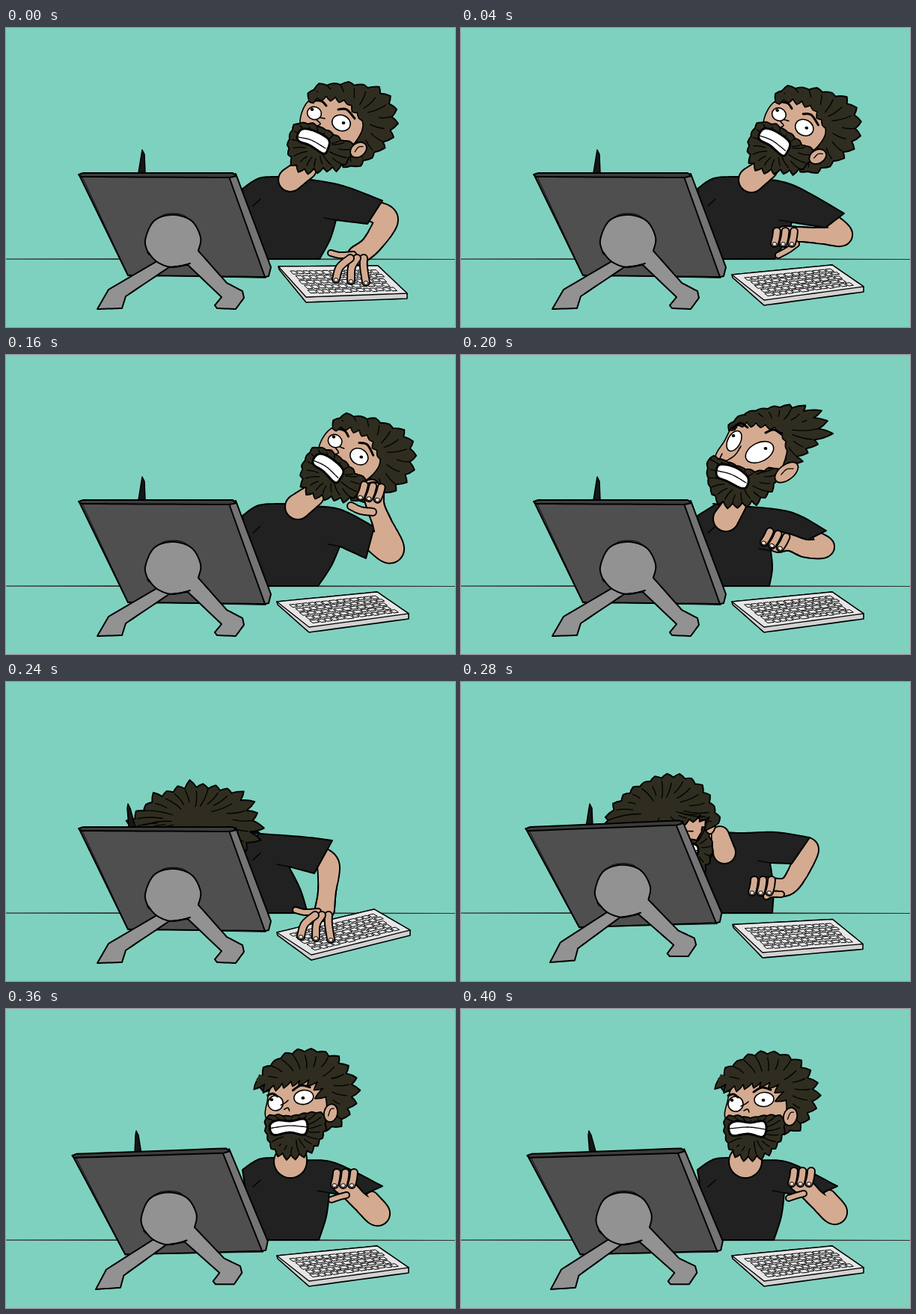
Write an HTML page with a canvas that moves like this. It is 600 by 400 pixels and loops after 440 ms.

```html
<!DOCTYPE html>
<html lang="en">
<head>
<meta charset="utf-8">
<title>Desk rage</title>
<style>
html, body { margin: 0; width: 100%; height: 100%; overflow: hidden; background: #7fd1bf; }
canvas { display: block; width: 600px; height: 400px; }
</style>
</head>
<body>
<canvas id="stage" width="600" height="400"></canvas>
<script>
const ctx = document.getElementById('stage').getContext('2d');
const SKIN = '#d4ab90', HAIR = '#2f2d20', INK = '#000', WHITE = '#fff', GRAY = '#929292';
ctx.lineJoin = ctx.lineCap = 'round';

const mix = (a, b, t) => a.map((v, i) => v + (b[i] - v) * t);
const groups = (s, size = 2) => {
  const n = s.match(/-?[\d.]+/g).map(Number);
  return Array.from({ length: n.length / size }, (_, i) => n.slice(i * size, (i + 1) * size));
};
function seeded(seed) {
  let s = seed * 7919 + 104729;
  return () => (s = s * 16807 % 2147483647) / 2147483647;
}

// Catmull-Rom samples, for points of any dimension.
function spline(p, n = 12, closed = false) {
  const out = [], count = closed ? p.length : p.length - 1;
  const at = i => closed ? p[(i + p.length) % p.length] : p[Math.max(0, Math.min(p.length - 1, i))];
  for (let i = 0; i < count; i++) for (let k = 0; k < n; k++) {
    const t = k / n, [a, b, c, d] = [at(i - 1), at(i), at(i + 1), at(i + 2)];
    out.push(b.map((v, j) => v + t / 2 * (c[j] - a[j] +
      t * (2 * a[j] - 5 * v + 4 * c[j] - d[j] + t * (3 * v - a[j] - 3 * c[j] + d[j])))));
  }
  out.push(at(count));
  return out;
}

// Points at equal distances along a line.
function even(line, n) {
  const len = [0];
  line.forEach((p, i) => { if (i) len.push(len[i - 1] + Math.hypot(p[0] - line[i - 1][0], p[1] - line[i - 1][1])); });
  return Array.from({ length: n + 1 }, (_, k) => {
    const goal = len[len.length - 1] * k / n;
    const i = Math.max(1, len.findIndex(l => l >= goal - 1e-6));
    return mix(line[i - 1], line[i], (goal - len[i - 1]) / (len[i] - len[i - 1] || 1));
  });
}

function ink(path, fill, width = 2) {
  if (fill) { ctx.fillStyle = fill; ctx.fill(path); }
  if (width) { ctx.strokeStyle = INK; ctx.lineWidth = width; ctx.stroke(path); }
}
function through(points) {
  const path = new Path2D();
  points.forEach((p, i) => path[i ? 'lineTo' : 'moveTo'](p[0], p[1]));
  return path;
}
// ";" makes a corner, "z" closes.
function shape(s, fill, width) {
  let all = [];
  for (const part of s.split(';')) all = all.concat(spline([...all.slice(-1), ...groups(part)]));
  const path = through(all);
  if (s.endsWith('z')) path.closePath();
  ink(path, fill, width);
}
const blob = (s, fill, width) => ink(through(spline(groups(s), 12, true)), fill, width);
const lines = (s, width = 1.3) => s.split('|').forEach(l => shape(l, null, width));

function oval([x, y, rx, ry, deg = 0], fill, width = 1.6) {
  const p = new Path2D();
  p.ellipse(x, y, rx, ry, deg * Math.PI / 180, 0, 7);
  ink(p, fill, width);
}
function put(draw, [x, y, deg, px, py]) {
  ctx.save();
  ctx.translate(px + x, py + y);
  ctx.rotate(deg * Math.PI / 180);
  ctx.translate(-px, -py);
  draw();
  ctx.restore();
}

// Chain of "x y radius" points with one common outline.
function limb(s, from = 0) {
  const chain = spline(groups(s, 3), 14), start = Math.round(from * chain.length);
  const dots = (list, color, grow) => {
    ctx.fillStyle = color;
    ctx.beginPath();
    for (const [x, y, r] of list) { ctx.moveTo(x + r + grow, y); ctx.arc(x, y, r + grow, 0, 7); }
    ctx.fill();
  };
  dots(chain.slice(start), INK, 1);
  dots(chain.slice(Math.max(0, start - 5)), SKIN, -1);
}
function finger(s, nail = true, r = 5) {
  const p = groups(s), [x, y] = p[p.length - 1];
  limb(p.map(q => [...q, r]).join(' '));
  if (nail) oval([x, y + 1, 3, 2.4], '#f3e6df', 1);
}
function claw(x, y, deg) {
  put(() => {
    for (const i of [2, 1, 0]) finger(`${i * 11.5 + 1} 1 ${i * 11.5} 9 ${i * 11.5 - 2} 17`);
  }, [x, y, deg, 0, 0]);
}
function typing() {
  finger('464 303 446 304 434 301', false, 4);
  for (const i of [2, 1, 0]) finger(`${460 + 9 * i} 308 ${446 + 16 * i} 320 ${441 + 20 * i} ${336 + 2 * i}`);
}

// Pulls every second point of an outline out into the tip of a lock.
function jag(line, n, size, wind, seed) {
  const rand = seeded(seed), base = even(line, n * 2), force = Math.hypot(...wind) || 1;
  return base.map((p, i) => {
    const a = base[Math.max(0, i - 1)], b = base[Math.min(base.length - 1, i + 1)];
    const l = Math.hypot(b[0] - a[0], b[1] - a[1]) || 1, nx = (b[1] - a[1]) / l, ny = (a[0] - b[0]) / l;
    if (i % 2 == 0) return p;
    const push = size * (.4 + rand()), blow = Math.max(0, (nx * wind[0] + ny * wind[1]) / force) * (.6 + rand() * .7);
    return [p[0] + nx * push + wind[0] * blow, p[1] + ny * push + wind[1] * blow];
  });
}
function locks(points) {
  const path = new Path2D();
  points.forEach((b, i) => {
    if (!i) return path.moveTo(...b);
    const a = points[i - 1];
    path.quadraticCurveTo((a[0] + b[0]) / 2 + (b[1] - a[1]) * .1, (a[1] + b[1]) / 2 - (b[0] - a[0]) * .1, ...b);
  });
  return path;
}
function tuft([outline, n, size, wind, seed]) {
  const points = jag(spline(groups(outline), 12, true), n, size, wind, seed), rand = seeded(seed + 1);
  ink(locks(points), HAIR, 1.9);
  const center = points.reduce((s, p) => [s[0] + p[0] / points.length, s[1] + p[1] / points.length], [0, 0]);
  for (let i = 0; i < points.length; i += 2) {
    const a = mix(points[i], center, rand() * .2), b = mix(points[i], center, .3 + rand() * .35);
    ink(locks([a, b]), null, 1.3);
  }
}
function fringe([line, n, size, wind, seed]) {
  const base = spline(groups(line)), tips = jag([...base].reverse(), n, size, wind, seed);
  const path = locks(tips);
  const fill = new Path2D(path);
  base.forEach(p => fill.lineTo(p[0] + 4, p[1] - 9));
  ink(fill, HAIR, 0);
  ink(path, null, 1.6);
}

const heads = {
  back: {
    hair: ['405 97 416 80 440 76 468 77 492 83 508 95 515 112 514 135 502 155 490 168 470 181 450 183 440 150', 19, 4, [9, -1], 3],
    face: '404 98 393 124 400 150 440 165 462 158 477 130 462 103 430 90',
    fringe: ['404 98 430 91 458 100 476 124', 7, 3, [0, 3], 5],
    beard: ['391 128 411 130 432 139 450 152 462 153 459 172 445 184 420 187 396 188 383 176 378 155 384 134', 19, 2, [-2, 5], 8],
    ear: [471, 163, 12, 9, -38],
    mouth: '390 142 397 135 413 138 431 149 430 162 424 168 406 157 391 151',
    bite: '391 146 408 150 427 161',
    eyes: [[412, 114, 9.5, 8.5, 15, 409, 109], [448, 127, 12.5, 10.5, 20, 451, 127]],
    brows: '414 97 422 98 428 104|444 109 455 109 466 121',
    nose: '420 120 426 121|415 123 420 128 416 131'
  },
  rear: {
    hair: ['358 101 366 88 385 77 410 72 435 70 458 75 472 85 478 98 473 112 462 124 450 134 438 146 420 140 400 110', 19, 3, [20, -3], 4],
    face: '366 92 352 115 340 137 350 160 400 175 424 160 436 122 420 97 390 86',
    fringe: ['360 101 376 90 400 92 420 97 432 108 436 128', 8, 3, [0, 4], 6],
    beard: ['332 139 350 141 370 149 395 157 422 152 418 172 406 187 385 196 358 198 340 188 331 168', 20, 2, [0, 6], 2],
    ear: [435, 157, 18, 10, -38],
    mouth: '345 147 366 150 383 163 382 176 374 178 356 169 342 162',
    bite: '343 155 362 160 381 171',
    eyes: [[365, 115, 8.5, 14.5, 27, 364, 108], [399, 130, 20, 12.5, -27, 407, 125]],
    brows: '363 98 373 91 383 97|407 104 418 100 428 106',
    nose: '374 122 366 134 354 142|349 132 346 138'
  },
  bang: {
    hair: ['168 194 180 177 198 159 225 147 252 141 285 145 308 152 320 170 330 186 326 200 322 214 300 222 240 205', 25, 8, [6, 0], 9]
  },
  bite: {
    over: true,
    hair: ['228 178 214 168 214 153 235 130 262 114 290 107 318 110 336 122 346 138 353 154 360 174 350 170 343 159 330 163 300 170 265 174', 24, 5, [-13, 9], 7],
    face: '258 184 300 165 340 168 348 190 335 212 300 215',
    beard: ['290 196 312 192 330 194 339 176 344 190 347 205 340 222 328 235 314 226', 14, 2, [2, 7], 3],
    ear: [348, 175, 7, 13, 10],
    mouth: '300 203 318 198 328 203 325 215 308 222',
    bite: '304 214 327 208',
    eyes: [],
    brows: '292 181 304 175 316 170|266 180 280 182',
    nose: '296 186 310 181 324 182|306 181 318 187'
  },
  stare: {
    hair: ['346 102 352 88 372 70 400 61 428 62 450 74 462 90 470 108 468 128 460 143 446 160 420 160 380 120', 21, 4, [7, 0], 5],
    face: '364 104 356 124 354 148 380 168 415 168 432 150 434 122 420 102 390 96',
    fringe: ['343 96 362 103 388 99 412 98 428 104 435 122', 9, 4, [-13, 9], 2],
    beard: ['354 146 370 144 388 146 408 143 430 146 430 165 420 182 405 193 385 197 365 190 355 173', 20, 2, [0, 6], 6],
    ear: [440, 144, 9, 12, 15],
    mouth: '358 156 368 150 386 152 404 150 408 160 403 171 384 167 362 169',
    bite: '359 160 384 158 407 161',
    eyes: [[367, 127, 10, 10, 0, 362, 122], [405, 121, 13, 9.5, -5, 404, 122]],
    brows: '391 111 402 105 414 108|357 116 364 114 370 118',
    nose: '374 130 380 127 384 124|378 136 383 134 385 138'
  }
};

function drawHead(h) {
  if (!h.over) tuft(h.hair);
  if (!h.face) return;
  blob(h.face, SKIN, 1.6);
  if (h.fringe) fringe(h.fringe);
  tuft(h.beard);
  oval(h.ear, SKIN, 1.8);
  const [ex, ey, rx, ry] = h.ear;
  lines(`${ex - rx * .4} ${ey + ry * .3} ${ex} ${ey - ry * .4} ${ex + rx * .5} ${ey - ry * .5}`);
  blob(h.mouth, WHITE, 3);
  lines(h.bite);
  for (const [x, y, w, t, deg, px, py] of h.eyes) {
    oval([x, y, w, t, deg], WHITE);
    oval([px, py, 2.4, 2], INK, 0);
  }
  lines(h.brows, 3);
  lines(h.nose, 1.6);
  if (h.over) tuft(h.hair);
}

// neck chain, then shoulder, cuff, hem, armpit and waist
const bodies = {
  slam: ['400 188 15 380 203 16', '450 211 503 231 483 262 441 257 419 309'],
  lean: ['408 188 15 388 203 17', '448 212 512 248 487 267 442 260 419 309'],
  scratch: ['410 188 15 390 203 17', '448 207 492 230 481 272 446 256 417 309'],
  rear: ['366 200 15 354 219 17', '440 210 488 235 462 248 414 262 412 309'],
  bang: ['300 205 9 305 210 9', '395 207 436 212 412 256 378 247 403 309'],
  bite: ['346 205 12 352 228 15', '420 201 466 208 442 243 413 242 416 309'],
  stare: ['382 200 20 380 204 22', '440 206 503 237 470 252 432 246 418 309']
};
function drawBody([neck, edge]) {
  const x = groups(neck, 3)[1][0], [shoulder, cuff, hem, pit, waist] = groups(edge);
  const bend = mix(pit, waist, .5);
  shape(`316 215 338 201 ${x - 17} 199;${x + 20} 202 ${shoulder} ${cuff};${hem};${pit};${bend[0] + 3} ${bend[1]} ${waist};330 309z`, '#212121');
  lines(`${pit};${pit[0] - 16} ${pit[1] - 3}|330 238 340 229`);
  limb(neck);
}

// arm chain, share of it that lies behind the shirt, hand
const arms = {
  slam: ['493 246 14 508 257 16 489 289 13 470 304 13', .6, typing],
  lean: ['497 259 10 509 277 14 484 278 11 450 276 10 433 279 14', .6, () => {
    finger('448 289 437 297 424 304', false, 4);
    claw(421, 271, 0);
  }],
  scratch: ['492 250 14 514 260 18 503 226 13 494 203 12 491 184 14', .5, () => {
    finger('490 210 474 208 461 202', false, 5);
    claw(478, 173, 8);
  }],
  rear: ['476 242 6 486 257 13 462 259 12 440 251 11 424 250 14', .5, () => claw(412, 235, 18)],
  bang: ['424 234 12 431 247 15 429 280 12 426 304 13', .6, () => put(typing, [-47, 4, 0, 0, 0])],
  bite: ['454 226 14 463 225 15 449 257 13 434 274 12 406 274 13', .55, () => {
    finger('428 284 415 284 408 287', false, 4);
    claw(391, 264, 0);
  }],
  stare: ['492 250 8 500 272 16 478 257 12 463 242 12 452 232 13', .5, () => {
    finger('458 247 447 250 438 253', false, 4);
    claw(444, 216, 0);
  }]
};

function monitor() {
  const panel = '98 197;303 198;347 333;163 331z';
  shape(panel, '#4f4f4f');
  put(() => shape(panel, null, .8), [1, 0, .7, 223, 265]);
  shape('298 199;307 195;354 320;351 332;346 333z', '#747474');
  shape('97 196;103 194;303 194;308 198;299 200;100 199z', '#3c3c3c');
  shape('189 300;205 310;137 350;122 376;155 375;160 359;218 320;243 317;288 360;279 371;282 375;307 376;318 361;316 352;295 341;256 297;223 280z', GRAY);
  oval([223, 284, 37, 34], GRAY, 0);
  lines('191 303 186 284 198 258 223 250 248 258 260 280 257 298|190 300 202 313 222 320 246 315', 2);
  lines('197 258 214 249 236 250 252 262|165 355;214 323', 1);
}

function board(c) {
  const [a, b, d, e] = groups(c.join(' ')), rand = seeded(4);
  const at = (u, v) => mix(mix(a, b, u), mix(e, d, u), v);
  const drop = ([x, y]) => `${x} ${y + 7}`;
  shape(`${a};${b};${d};${drop(d)};${drop(e)};${a[0] + 1} ${a[1] + 4}z`, '#d2d2d2', 1.6);
  shape(`${a};${b};${d};${e}z`, '#e6e6e6', 1.3);
  for (let r = 0; r < 5; r++) for (let u = .08 + r % 2 * .01; u < .91;) {
    const w = .042 + rand() * .022, v = .15 + r * .157, h = .09 + rand() * .03;
    const key = through([at(u, v), at(u + w, v), at(u + w, v + h), at(u, v + h)]);
    key.closePath();
    ink(key, '#efefef', 1);
    u += w + .017;
  }
}
function pen(x, lean) {
  shape(`${x} 163;${x + 3} 169;${x + lean + 4} 194;${x + lean - 5} 194;${x - 1} 169z`, '#161616', 1.5);
}
function desk() {
  ctx.fillStyle = '#33302f';
  ctx.fill(through([[0, 308.4], [300, 308], [600, 308.9], [600, 310], [300, 310.3], [0, 309.8]]));
}

const rest = [362, 330, 496, 317, 538, 346, 405, 364];
const hit = [364, 319, 497, 318, 536, 355, 401, 360];
const bump = [362, 335, 492, 304, 540, 332, 408, 365];
const jolt = mix(rest, hit, .5);
const still = [0, 0, 0, 0, 0], shoved = [-2, -1, -2.1, 122, 376], pushed = [-3, -1, -2.5, 122, 376];
const tilt = t => [20 * t, 6.5 * t, 13 * t, 430, 119.5];
const scratched = [26, 5, 13, 430, 119.5];

// body and arm, head, head move, arm move, pen, keyboard, monitor move
const steps = [
  ['slam', 'back', still, still, [182, 0], hit, still],
  ['lean', 'back', tilt(.6), still, [182, 0], rest, still],
  ['lean', 'back', tilt(1), still, [169, 7], rest, still],
  ['scratch', 'back', scratched, [0, 0, -20, 515, 262], [182, 0], rest, still],
  ['scratch', 'back', scratched, still, [182, 0], rest, still],
  ['rear', 'rear', still, still, [182, 0], rest, still],
  ['bang', 'bang', still, still, [163, 6], bump, still],
  ['bite', 'bite', [-12, 18, -6, 320, 200], still, [172, 0], jolt, pushed],
  ['bite', 'bite', still, still, [178, -4], jolt, pushed],
  ['stare', 'stare', [-3, -2, -3, 385, 200], [-3, 2, 0, 0, 0], [174, 3], rest, shoved],
  ['stare', 'stare', still, still, [171, 6], rest, shoved]
];

function render([pose, head, headMove, armMove, stylus, keys, shove]) {
  const [arm, behind, hand] = arms[pose];
  ctx.fillStyle = '#7fd1bf';
  ctx.fillRect(0, 0, 600, 400);
  desk();
  board(keys);
  put(() => limb(arm), armMove);
  drawBody(bodies[pose]);
  put(() => drawHead(heads[head]), headMove);
  put(() => { limb(arm, behind); hand(); }, armMove);
  pen(...stylus);
  put(monitor, shove);
}

let shown = -1;
function tick() {
  const i = Math.floor(performance.now() % 440 / 40);
  if (i !== shown) render(steps[shown = i]);
  requestAnimationFrame(tick);
}
tick();
</script>
</body>
</html>
```
